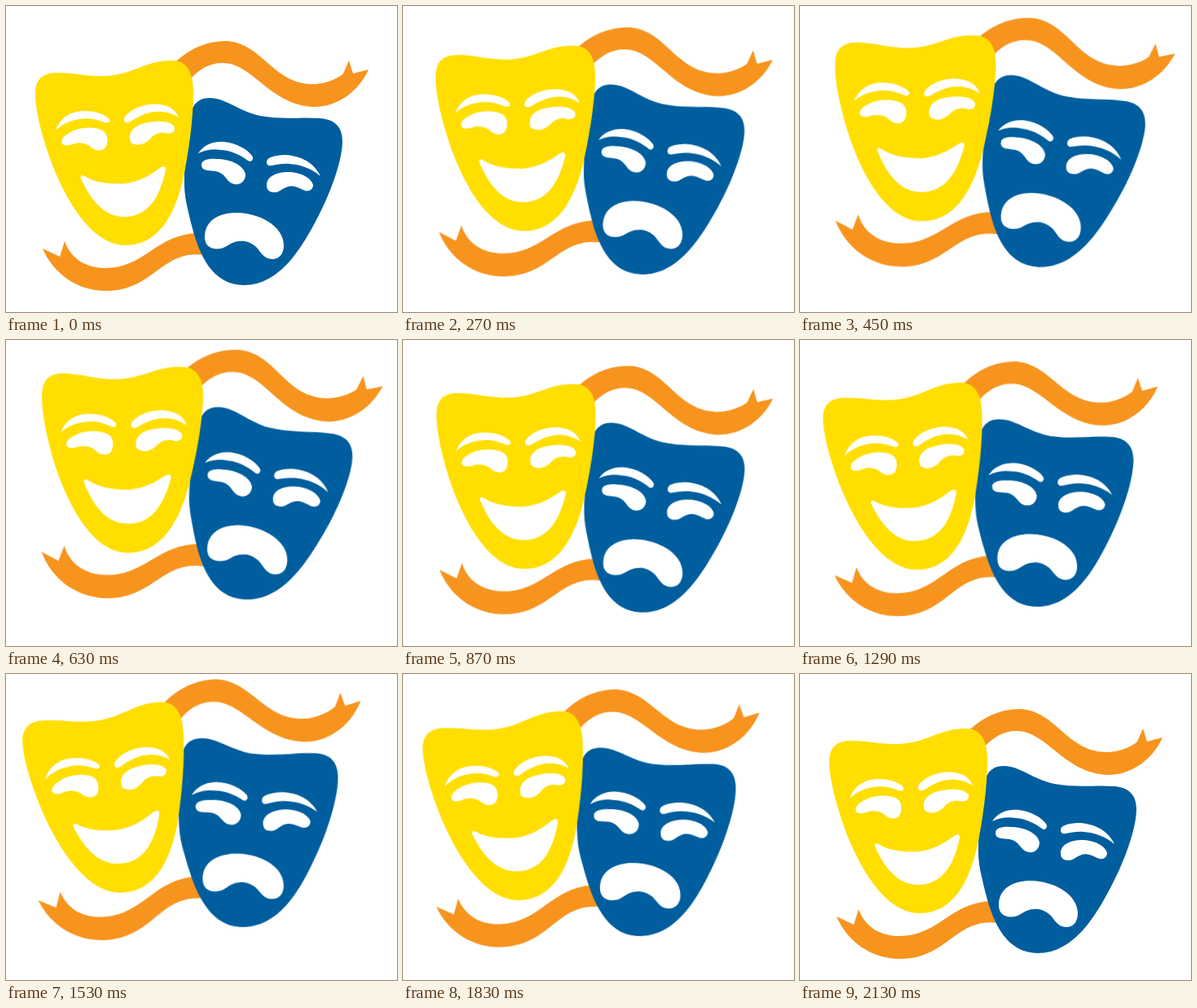
These frames come from a looping animation (480x376 px, 2.16 s). An HTML page without scripts:

```html
<!DOCTYPE html>
<html lang="en">
<head>
<meta charset="utf-8">
<title>Theatre masks</title>
<style>
  html, body { margin: 0; width: 100%; height: 100%; overflow: hidden; background: #fff; }
  svg { display: block; width: 100%; height: 100%; }
  .ribbon { fill: #f7941e; }
  .joy { fill: #ffde00; }
  .grief { fill: #005e9e; }
  .face { fill: #fff; }

  /* 72 ticks of 30 ms: sway and grow up to the right, settle, up to the left, settle */
  .sway { transform-origin: 245px 188px; animation: sway 2160ms infinite; }
  @keyframes sway {
    0%       { transform: translate(0, 0) rotate(0deg) scale(1); animation-timing-function: steps(9); }
    12.5%    { transform: translate(4px, -16px) rotate(1.5deg) scale(1.01); animation-timing-function: steps(9); }
    25%      { transform: translate(8.5px, -32.5px) rotate(3.1deg) scale(1.022); animation-timing-function: steps(3); }
    29.1667% { transform: translate(8px, -29.5px) rotate(2.9deg) scale(1.02); animation-timing-function: steps(8); }
    40.2778% { transform: translate(4.5px, -10.8px) rotate(1.6deg) scale(1.008); animation-timing-function: steps(7); }
    50%      { transform: translate(0, 0) rotate(0deg) scale(1); animation-timing-function: steps(7); }
    59.7222% { transform: translate(-4.2px, -15px) rotate(-1.5deg) scale(1.007); animation-timing-function: steps(8); }
    70.8333% { transform: translate(-7.5px, -32.5px) rotate(-2.95deg) scale(1.02); animation-timing-function: steps(3); }
    75%      { transform: translate(-8px, -34.5px) rotate(-3.1deg) scale(1.022); animation-timing-function: steps(3); }
    79.1667% { transform: translate(-7.5px, -31.5px) rotate(-2.9deg) scale(1.02); animation-timing-function: steps(8); }
    90.2778% { transform: translate(-4.2px, -11px) rotate(-1.5deg) scale(1.008); animation-timing-function: steps(6); }
    98.6111%, 100% { transform: translate(0, 0) rotate(0deg) scale(1); }
  }
</style>
</head>
<body>
<svg viewBox="0 0 480 376">
  <g class="sway">
    <g class="ribbon">
      <path d="M205 72C222 54 245 43 270 43C315 45 327 96 377 96C395 96 412 86 414 83L421 67 426 83 445 78C434 103 409 124 378 124C324 122 303 70 266 70C249 70 237 78 226 90L215 95Z"/>
      <path d="M45 298L66 308 72 289C80 312 100 322 122 322C170 322 184 281 235 279L245 306C190 298 183 350 122 350C88 350 58 329 45 298Z"/>
    </g>

    <path class="grief" d="M219 218C219 190 222 150 228 128C232 117 240 113 250 113C270 113 285 129 312 135C340 140 365 136 385 138C403 139 413 148 413 166C413 190 398 230 384 257C364 296 337 343 292 343C253 343 237 305 228 270C222 245 219 234 219 218Z"/>
    <g class="face">
      <path d="M236 181C243 170 256 166 268 167C282 168 296 176 302 184C305 188 301 193 297 190C289 184 278 178 265 177C254 175 244 177 236 181Z"/>
      <path d="M320 192C320 186 328 184 340 183C358 183 377 190 386 209C374 199 361 195 348 194C340 193 333 195 326 196C322 197 320 195 320 192Z"/>
      <path d="M240 195C240 189 249 187 259 188C274 188 292 195 294 207C294 215 288 220 281 219C273 218 271 211 266 207C260 202 254 203 247 202C242 201 240 199 240 195Z"/>
      <path d="M320 220C320 209 333 204 346 204C361 204 375 211 377 220C377 226 371 229 365 226C358 223 353 220 346 222C339 224 336 229 330 229C323 229 320 226 320 220Z"/>
      <path d="M244 284C244 263 262 254 283 254C310 254 341 270 341 294C341 305 335 311 327 311C316 311 313 302 307 296C300 290 293 288 287 289C277 289 272 296 264 298C252 300 244 295 244 284Z"/>
    </g>

    <path class="joy" d="M36 108C36 92 43 83 60 82C80 81 100 87 122 86C158 84 170 67 204 67C221 67 230 80 230 106C230 140 224 180 218 210C208 255 188 294 147 294C108 294 78 246 60 203C46 168 36 130 36 108Z"/>
    <g class="face">
      <path d="M61 153C66 138 79 129 96 129C108 129 119 132 126 138C129 141 126 145 121 143C110 139 100 137 90 139C77 141 68 146 61 153Z"/>
      <path d="M145 141C144 137 149 132 155 128C170 119 190 118 202 125C207 128 210 132 212 137C202 130 188 128 176 131C168 133 160 137 153 142C149 144 146 144 145 141Z"/>
      <path d="M69 169C66 162 76 156 86 152C98 148 114 149 120 154C125 158 126 168 122 174C118 179 110 178 105 174C100 169 92 167 84 169C77 172 71 172 69 169Z"/>
      <path d="M152 163C151 152 161 145 175 143C190 140 204 142 207 149C208 155 202 158 196 156C188 155 183 157 178 162C172 169 164 172 158 170C154 169 152 167 152 163Z"/>
      <path d="M92 212C90 208 94 207 98 210C112 218 130 219 147 218C166 215 178 207 189 199C193 196 197 197 196 202C190 229 178 259 145 259C117 259 101 232 92 212Z"/>
    </g>
  </g>
</svg>
</body>
</html>
```
